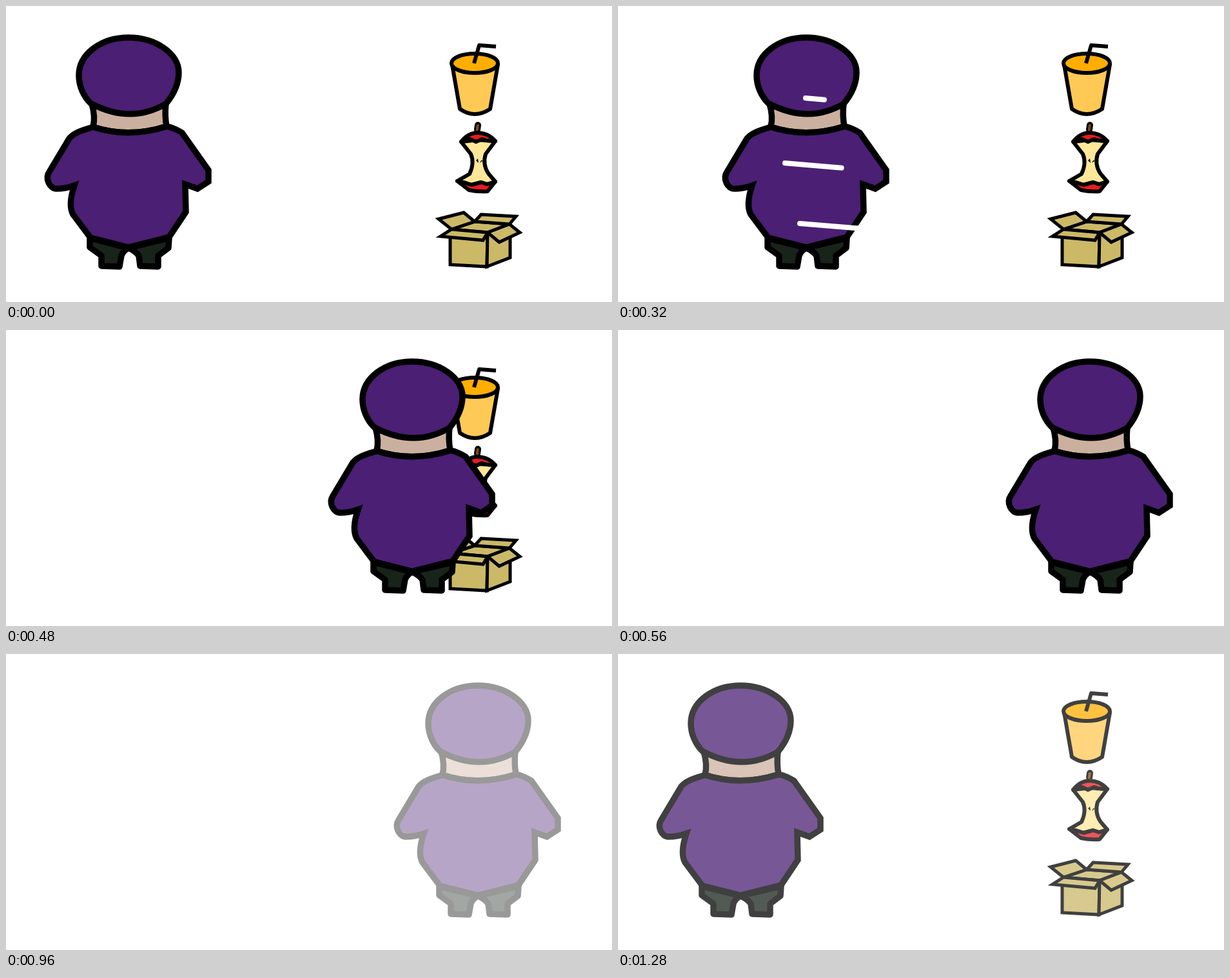
Write an HTML page without scripts that moves like this. It is 940 px wide and 460 px high and loops after 1.32 s.

```html
<!DOCTYPE html>
<html lang="en">
<head>
<meta charset="utf-8">
<title>Clean sweep</title>
<style>
  html, body { margin: 0; width: 100%; height: 100%; overflow: hidden; background: #fff; }
  svg { display: block; width: 940px; height: 460px; }
  svg * { stroke-linejoin: round; }

  .scene, .man, .items, .streaks { animation: 1320ms step-end infinite; }
  .scene { animation-name: fade; }
  .man { animation-name: dash; }
  .items { animation-name: vanish; }
  .streaks { animation-name: show; }

  .man path { stroke: #000; stroke-width: 9.500; }
  .man .body { stroke-linejoin: miter; }
  .shirt { fill: #4b1f74; }
  .skin { fill: #ccb09f; }
  .legs { fill: #18241a; }

  .items { stroke: #000; stroke-width: 6; }
  .box { fill: #cbb968; stroke-width: 5; }
  .box path { stroke-linejoin: miter; }

  .streaks path {
    fill: none; stroke: #fff; stroke-width: 8; stroke-linecap: round;
    animation: trim 1320ms infinite;
  }

  /* The whole picture fades out, then back in */
  @keyframes fade {
    0% { opacity: 1; }
    66.66% { opacity: 1; animation-timing-function: steps(5, start); }
    81.81% { opacity: 0; }
    84.84% { opacity: .083; animation-timing-function: steps(5, end); }
    100% { opacity: .917; }
  }
  @keyframes dash {
    0% { transform: none; }
    18.18% { transform: translateX(10px); }
    21.21% { transform: translateX(44px); }
    24.24% { transform: translateX(102px); }
    27.27% { transform: translateX(182px); }
    30.3% { transform: translateX(271px); }
    33.33% { transform: translateX(360px); }
    36.36% { transform: translateX(440px); }
    39.39% { transform: translateX(505px); }
    42.42% { transform: translateX(542px); }
    84.84%, 100% { transform: none; }
  }
  @keyframes vanish {
    0% { visibility: visible; }
    42.42% { visibility: hidden; }
    84.84%, 100% { visibility: visible; }
  }
  @keyframes show {
    0% { visibility: hidden; }
    21.21% { visibility: visible; }
    36.36%, 100% { visibility: hidden; }
  }
  /* --a, --b: lengths; --s, --e: start and end offsets */
  @keyframes trim {
    0%, 18.18% {
      stroke-dasharray: 0 999; stroke-dashoffset: 0;
      animation-timing-function: steps(2, end);
    }
    24.24% {
      stroke-dasharray: var(--a) 999; stroke-dashoffset: 0;
      animation-timing-function: steps(2, end);
    }
    30.3% {
      stroke-dasharray: var(--b) 999; stroke-dashoffset: var(--s);
      animation-timing-function: steps(2, end);
    }
    36.36%, 100% { stroke-dasharray: 0 999; stroke-dashoffset: var(--e); }
  }
</style>
</head>
<body>
<svg viewBox="0 0 940 460">
  <g class="scene">
    <g class="items">
      <g class="cup">
        <path fill="#ffc955" d="M692 91L704 160Q727 176 751 160L763 91Z"/>
        <ellipse fill="#ffae00" cx="727" cy="89" rx="36" ry="15"/>
        <path fill="none" d="M726 89L734 61L760 63"/>
      </g>
      <g class="apple">
        <path fill="#ffe799" d="M706 211L721 230Q727 244 719 261L700 272L713 275L722 278L737 274L746 277L759 273L748 260Q739 246 744 230L759 210L732 208Z"/>
        <path fill="#e81c23" d="M706 211Q717 197 731 197Q748 197 759 210L745 209L738 207L729 211L720 207Z"/>
        <path fill="#e81c23" d="M700 272L713 275L722 278L737 274L746 277L759 273L747 288Q732 289 718 286Z"/>
        <path stroke-width="10" stroke-linecap="round" d="M732 185L731 192"/>
        <path stroke="#7a4a10" stroke-width="4" d="M732 184L730.500 194"/>
        <path stroke="none" d="M729 240L732 237L733 244ZM735 244L737 240L740 240Z"/>
      </g>
      <g class="box">
        <path d="M689 354V402L746 405L747 352Z"/>
        <path d="M746 405L782 391V350L747 352Z"/>
        <path d="M691 347L727 335L781 339L747 352Z"/>
        <path d="M671 331L710 321L727 335L691 347Z"/>
        <path d="M737 324L791 327L781 339L727 335Z"/>
        <path d="M691 347L747 352L740 364L674 358Z"/>
        <path d="M747 352L781 339L797 352L765 367Z"/>
      </g>
    </g>

    <g class="man">
      <path class="legs" d="M130 361V375L148 388V404L176 405L179 388Q182 380 190 376Z"/>
      <path class="legs" d="M253 361L252 376L236 388V405L208 404L206 388Q200 380 190 376Z"/>
      <path class="skin" d="M133 152Q139 172 135 188Q190 206 249 187Q246 170 248 152Z"/>
      <path class="shirt body" d="M135 188C120 193 106 196 98 206L67 258C60 268 68 284 78 284Q92 284 106 279C100 297 98 313 104 324L131 360L190 375L253 359L279 320L278 277L297 284L314 273V255L273 197Q262 190 250 187Q190 206 135 188Z"/>
      <path class="shirt" d="M131 151C120 140 113 124 113 108C113 75 147 49 190 49C232 49 268 74 268 103C268 122 258 140 248 152Q193 184 131 151Z"/>
    </g>

    <g class="streaks">
      <path transform="translate(291 143) rotate(5)" d="M0 0H400" style="--a:29;--b:88;--s:-60;--e:-190"/>
      <path transform="translate(259 244) rotate(4.900)" d="M0 0H400" style="--a:88;--b:126;--s:-50;--e:-215"/>
      <path transform="translate(282 338) rotate(4.700)" d="M0 0H400" style="--a:100;--b:29;--s:-118;--e:-170"/>
      <path transform="translate(418 411) rotate(-7)" d="M0 0H400" style="--a:0;--b:91;--s:0;--e:-130"/>
      <path transform="translate(424 51) rotate(-7)" d="M0 0H400" style="--a:0;--b:8;--s:0;--e:-10"/>
    </g>
  </g>
</svg>
</body>
</html>
```
